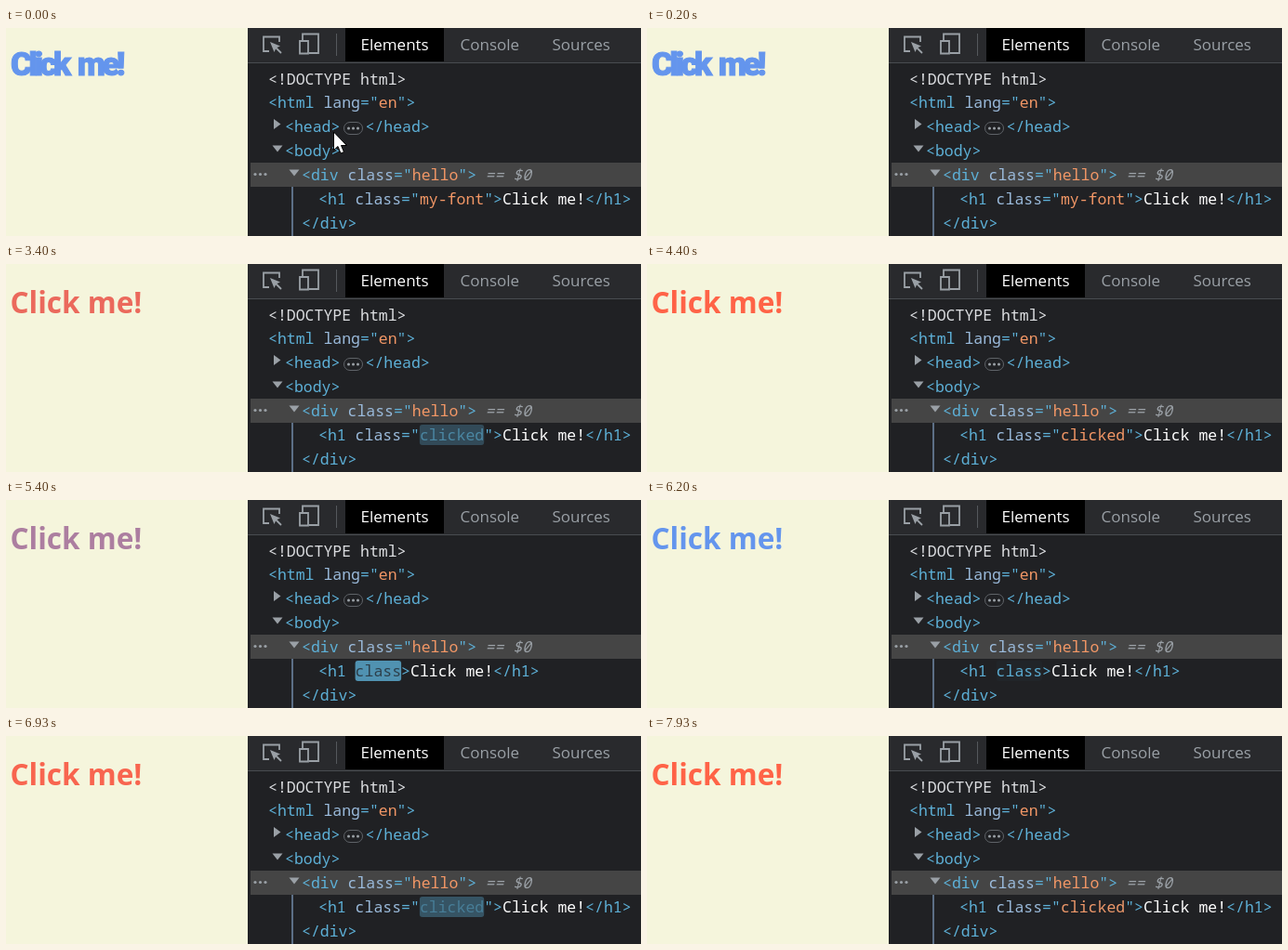
Write an HTML page with a canvas that moves like this. It is 683 px wide and 224 px high and loops after 8000 ms.

```html
<!DOCTYPE html>
<html lang="en">
<head>
<meta charset="utf-8">
<style>
  html, body { margin: 0; width: 100%; height: 100%; overflow: hidden; background: #202124; }
  canvas { display: block; }
</style>
</head>
<body>
<canvas width="683" height="224"></canvas>
<script>
const ctx = document.querySelector('canvas').getContext('2d', { alpha: false });
const LOOP = 8000, FPS = 15;
const MONO = '500 16.5px "Noto Sans Mono", monospace';
const BLUE = [100, 149, 237], TOMATO = [255, 99, 71];
const PANEL = [32, 33, 36], TAG = [93, 176, 215], ATTR = [155, 187, 220], VALUE = [242, 151, 102];
const GRAY = '#9aa0a6', WHITE = '#fff';

const clamp = v => Math.min(1, Math.max(0, v));
const rgb = (c, alpha = 1) => `rgba(${c.map(Math.round)}, ${alpha})`;
const mix = (a, b, p) => a.map((v, i) => v + (b[i] - v) * p);

function bezier(x1, y1, x2, y2) {
  const at = (a, b, s) => 3 * a * s * (1 - s) ** 2 + 3 * b * s * s * (1 - s) + s ** 3;
  return x => {
    if (x <= 0) return 0;
    if (x >= 1) return 1;
    let low = 0, high = 1;
    for (let i = 0; i < 20; i++) {
      const mid = (low + high) / 2;
      if (at(x1, x2, mid) < x) low = mid; else high = mid;
    }
    return at(y1, y2, low);
  };
}
const ease = bezier(.25, .1, .25, 1);
const decelerate = bezier(0, 0, .2, 1);

function rect(x, y, w, h, color, radius = 0) {
  ctx.fillStyle = color;
  ctx.beginPath();
  ctx.roundRect(x, y, w, h, radius);
  ctx.fill();
}

function text(str, x, y, font, color) {
  ctx.font = font;
  ctx.fillStyle = color;
  ctx.fillText(str, x, y);
  return x + ctx.measureText(str).width;
}

function polygon(color, ...points) {
  ctx.fillStyle = color;
  ctx.beginPath();
  points.forEach(([x, y]) => ctx.lineTo(x, y));
  ctx.closePath();
  ctx.fill();
}

function dots(x, y, gap, radius) {
  ctx.fillStyle = GRAY;
  for (let i = 0; i < 3; i++) {
    ctx.beginPath();
    ctx.arc(x + i * gap, y, radius, 0, 7);
    ctx.fill();
  }
}

const rowY = row => Math.round(60.5 + row * 25.9);

// Pieces are [string, colour, optional highlight opacity].
function code(x, row, ...pieces) {
  const y = rowY(row);
  for (const [str, color, glow = 0] of pieces) {
    ctx.font = MONO;
    if (glow > 0) rect(x, y - 17, ctx.measureText(str).width, 22, rgb(TAG, glow), 3);
    x = text(str, x, y, MONO, color);
  }
  return x;
}

// Value-changed flash: dark text on blue, then the inherited colour, then its own.
function flash(t, start, ownColor) {
  const age = (t - start) / 1400;
  const fade = decelerate(clamp(age / .8));
  const settle = decelerate(clamp((age - .8) / .2));
  return [rgb(mix(mix(PANEL, TAG, fade), ownColor, settle)), 1 - fade];
}

function drawHeading(t) {
  if (t < 2930) {
    ctx.letterSpacing = '-3.6px';
    ctx.wordSpacing = '5px';
    text('Click me!', 5, 50.5, '900 35px Roboto, sans-serif', rgb(BLUE));
    ctx.strokeStyle = rgb(BLUE);
    ctx.lineWidth = 1;
    ctx.lineJoin = 'miter';
    ctx.strokeText('Click me!', 5, 50.5);
    ctx.letterSpacing = ctx.wordSpacing = '0px';
    return;
  }
  const red = ease(clamp((t - 2933) / 800))
    - ease(clamp((t - 5150) / 800))
    + ease(clamp((t - 6350) / 800));
  text('Click me!', 4.5, 53, 'bold 31.5px "Open Sans", sans-serif', rgb(mix(BLUE, TOMATO, red)));
}

function drawToolbar() {
  rect(260, 0, 423, 37, '#292a2d');
  rect(260, 37, 423, 1, '#494c50');
  rect(365, 0, 106, 36, '#000');
  rect(355, 6, 1, 24, '#55585c');
  const font = '17px "Open Sans", sans-serif';
  text('Elements', 381.5, 24, font, WHITE);
  text('Console', 488.5, 24, font, GRAY);
  text('Sources', 587.5, 24, font, GRAY);

  ctx.strokeStyle = GRAY;
  ctx.lineWidth = 1.8;
  ctx.lineJoin = 'miter';
  ctx.stroke(new Path2D('M283 25H277V9.500H294V15M290 21L296 27'));
  polygon(GRAY, [284, 15], [295, 19.5], [290.5, 21.5], [288.5, 26]);
  ctx.stroke(new Path2D('M319 13V6.500H336V27H326M316 14H325V27.500H316Z'));
}

function drawTree(t) {
  const tag = rgb(TAG), attr = rgb(ATTR), value = rgb(VALUE);
  rect(263, 145, 420, 26, '#454545');
  rect(307, 171, 2, 53, '#5c6f86');
  dots(268, 157.5, 5.5, 1.6);
  polygon(GRAY, [288, 98], [295.5, 103.5], [288, 109]);
  polygon(GRAY, [286.5, 126.5], [297.5, 126.5], [292, 133.5]);
  polygon(GRAY, [304.5, 152.5], [315.5, 152.5], [310, 159.5]);

  code(282, 0, ['<!DOCTYPE html>', '#dcdee1']);
  code(282, 1, ['<html ', tag], ['lang', attr], ['="', tag], ['en', value], ['">', tag]);
  code(300, 2, ['<head>', tag]);
  ctx.strokeStyle = '#5f6368';
  ctx.lineWidth = 1;
  ctx.beginPath();
  ctx.roundRect(363.5, 101.5, 20, 13, 6.5);
  ctx.stroke();
  dots(368.5, 108, 5, 1.5);
  code(386.5, 2, ['</head>', tag]);
  code(300, 3, ['<body>', tag]);
  const end = code(318, 4, ['<div ', tag], ['class', attr], ['="', tag], ['hello', value], ['">', tag]);
  text('== $0', end + 9.5, rowY(4), 'italic ' + MONO, GRAY);

  let attribute;
  if (t >= 5330 && t < 6600) {
    attribute = [['class', ...flash(t, 5330, ATTR)]];
  } else {
    const name = t < 3000 ? ['my-font', value]
      : ['clicked', ...flash(t, t < 5330 ? 3000 : 6600, VALUE)];
    attribute = [['class', attr], ['="', tag], name, ['"', tag]];
  }
  code(336, 5, ['<h1 ', tag], ...attribute, ['>', tag], ['Click me!', WHITE], ['</h1>', tag]);
  code(318, 6, ['</div>', tag]);
}

function drawCursor(t) {
  if (t >= 195) return;
  const p = clamp((t - 40) / 155);
  ctx.save();
  ctx.translate(352.5 * (1 - p), 112 * (1 - p) + 392 * p * (1 - p));
  const arrow = new Path2D('M0 0V19.500L4.500 15.500L7.500 23L11 21.500L8 14.500H14Z');
  ctx.fillStyle = WHITE;
  ctx.fill(arrow);
  ctx.strokeStyle = '#000';
  ctx.lineWidth = 1;
  ctx.stroke(arrow);
  ctx.restore();
}

function draw(t) {
  rect(0, 0, 683, 224, rgb(PANEL));
  rect(0, 0, 260, 224, '#f5f5dc');
  drawHeading(t);
  drawToolbar();
  drawTree(t);
  drawCursor(t);
}

const started = performance.now();
function tick() {
  const t = (performance.now() - started) % LOOP;
  draw(Math.floor((t + 5) * FPS / 1000) * 1000 / FPS % LOOP);
  requestAnimationFrame(tick);
}
tick();
</script>
</body>
</html>
```
